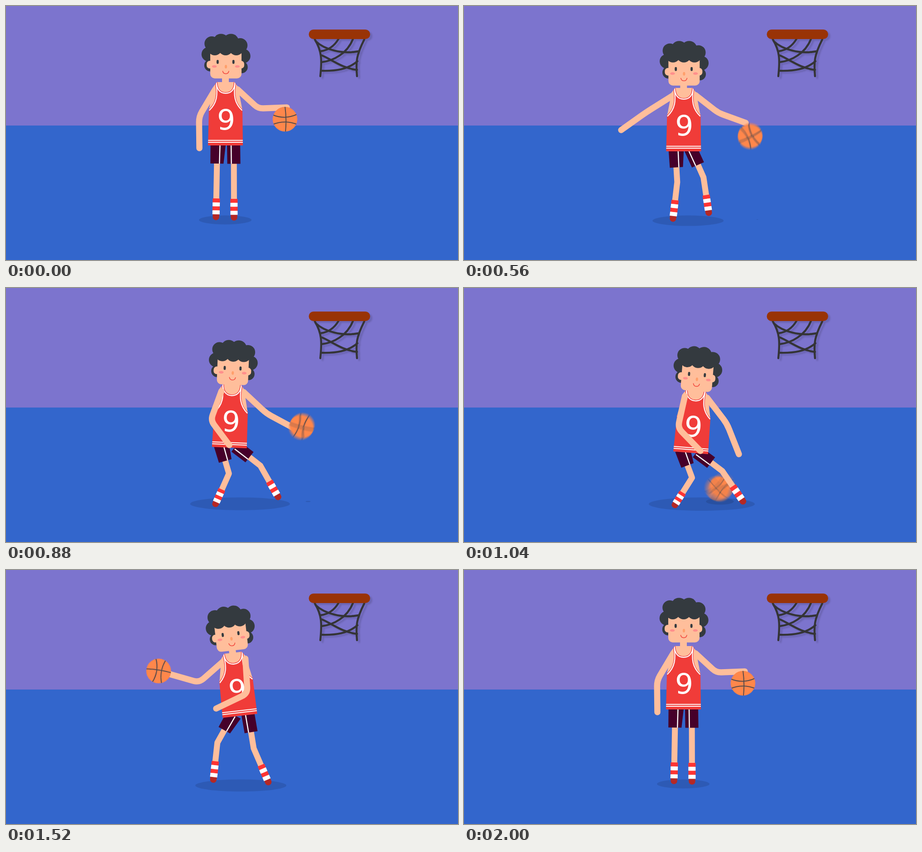
An HTML page with a canvas for the animation above (2080 ms loop, 998x561 px).

```html
<!DOCTYPE html>
<html lang="en">
<head>
<meta charset="utf-8">
<title>Dribble</title>
<style>
  html, body { margin: 0; width: 998px; height: 561px; overflow: hidden; background: #36c; }
  svg, canvas { position: absolute; left: 0; top: 0; display: block; }
  .hoop { filter: blur(.5px) drop-shadow(5px 4px 1.5px rgba(0, 0, 0, .13)); }
  .net { fill: none; stroke: #343436; stroke-width: 4.4; stroke-linecap: round; }
</style>
</head>
<body>
<svg width="998" height="561" viewBox="0 0 998 561">
  <rect width="998" height="264" fill="#7c74ce"/>
  <rect y="264" width="998" height="297" fill="#3366cc"/>
  <g class="hoop">
    <g class="net">
      <path d="M682 74C697 99 698 118 694 155"/>
      <path d="M791 74C774 108 772 122 775 155"/>
      <path d="M684 78C703 96 742 107 779 100"/>
      <path d="M734 73C724 90 710 98 694 100"/>
      <path d="M766 73C754 104 724 121 697 124"/>
      <path d="M697 109C716 116 742 138 775 141"/>
      <path d="M776 122C755 140 728 144 696 143"/>
    </g>
    <rect x="668.5" y="52" width="135.5" height="21" rx="10.5" fill="#993306"/>
  </g>
</svg>
<canvas id="stage" width="998" height="561"></canvas>
<script>
const LOOP = 2080, STEP = 80, SHUTTER = 18, RAD = Math.PI / 180;
const SHIN = 88, FLOOR = 446;
const SKIN = '#ffbe9b', HAIR = '#343a3f', RED = '#f03c39', SOCK = '#ff3434',
      SHOE = '#b42825', SHORTS = '#46002a', SHADE = 'rgba(0,0,0,.11)';
const c = document.getElementById('stage').getContext('2d');

// Torso: x, y of the hem and tilt. Hands and feet: x, y and bend of the joint above.
const stand = {
  torso: [485, 308, 0],
  leftHand: [427, 314, 19], rightHand: [620, 224, 24],
  leftFoot: [463.5, 473, 0], rightFoot: [503.5, 474, 0]
};
const poses = [
  { t: 0, ...stand },
  { t: 320, ...stand, rightHand: [599, 268, -6] },
  { t: 560, leftHand: [347, 274, 2], rightHand: [622, 258, 10] },
  { t: 720, torso: [486, 335, 0], leftHand: [435, 320, 29], rightHand: [650, 253, 23],
    leftFoot: [459, 480, -14], rightFoot: [576, 458, -15] },
  { t: 1040, torso: [501, 364, 4.5], leftHand: [522, 360, 34], rightHand: [607, 367, -10],
    leftFoot: [462, 485, -30], rightFoot: [620, 477, -12] },
  { t: 1200, torso: [495, 350, -1.7], leftHand: [432, 360, 28], rightHand: [543, 355, -17],
    leftFoot: [476, 475, -8], rightFoot: [608, 475, -1] },
  { t: 1520, torso: [517, 322, -6.6], leftHand: [358, 229, -34], rightHand: [464, 306, -43],
    leftFoot: [457, 470, 15], rightFoot: [582, 475, 10] },
  { t: 2000, ...stand }
];

// Pull 1 speeds up towards the point, -1 slows down.
const ballPath = [
  { t: 0, x: 616, y: 250, turn: 0 },
  { t: 370, x: 609, y: FLOOR, turn: 0, pull: 1 },
  { t: 640, x: 634, y: 272, turn: 70, pull: -1 },
  { t: 720, x: 652, y: 274, turn: 95 },
  { t: 800, x: 664, y: 288, turn: 102, pull: 1 },
  { t: 1040, x: 565, y: FLOOR, turn: 135, pull: 1 },
  { t: 1200, x: 420, y: 358, turn: 212 },
  { t: 1400, x: 322, y: 246, turn: 262, pull: -1 },
  { t: 1520, x: 337, y: 223, turn: 280, pull: -1 },
  { t: 1680, x: 364, y: 274, turn: 295, pull: 1 },
  { t: 1840, x: 475, y: FLOOR, turn: 325, pull: 1 },
  { t: 2000, x: 616, y: 250, turn: 360, pull: -1 }
];

function segment(keys, t) {
  let i = 0;
  while (i < keys.length - 2 && t >= keys[i + 1].t) i++;
  const a = keys[i], b = keys[i + 1];
  return { i, a, b, u: Math.max(0, Math.min(1, (t - a.t) / (b.t - a.t))) };
}

// Smooth curve through the poses that never overshoots them.
function track(part, t) {
  const keys = poses.filter(p => p[part]);
  const { i, a, b, u } = segment(keys, t), span = b.t - a.t, v = 1 - u;
  const rate = (k, n) => (keys[k + 1][part][n] - keys[k][part][n]) / (keys[k + 1].t - keys[k].t);
  const slope = (k, n) => {
    if (k < 1 || k > keys.length - 2) return 0;
    const p = rate(k - 1, n), q = rate(k, n);
    return p * q > 0 ? 2 * p * q / (p + q) : 0;
  };
  return a[part].map((from, n) =>
    from * (1 + 2 * u) * v * v + b[part][n] * u * u * (3 - 2 * u)
    + span * (slope(i, n) * u * v * v - slope(i + 1, n) * u * u * v));
}

function ballAt(t) {
  const { a, b, u } = segment(ballPath, t), v = u + (b.pull || 0) * (u * u - u);
  const mix = key => a[key] + (b[key] - a[key]) * v;
  return { x: mix('x'), y: mix('y'), turn: mix('turn') };
}

// Point on the way from a to b, pushed sideways by bend.
function joint([ax, ay], [bx, by], share, bend) {
  const dx = bx - ax, dy = by - ay, d = Math.hypot(dx, dy);
  return [ax + dx * share - dy / d * bend, ay + dy * share + dx / d * bend];
}
function onTorso([x, y, tilt], dx, dy) {
  const cos = Math.cos(tilt * RAD), sin = Math.sin(tilt * RAD);
  return [x + dx * cos - dy * sin, y + dx * sin + dy * cos];
}
const between = (a, b, k) => a.map((v, i) => v + (b[i] - v) * k);
const angle = (a, b) => Math.atan2(b[1] - a[1], b[0] - a[0]) / RAD - 90;
const gap = (a, b) => Math.hypot(b[0] - a[0], b[1] - a[1]);

function ellipse(x, y, rx, ry, fill) {
  c.beginPath();
  c.ellipse(x, y, rx, ry, 0, 0, 7);
  c.fillStyle = fill;
  c.fill();
}
function box(x, y, w, h, r, fill) {
  c.beginPath();
  c.roundRect(x, y, w, h, r);
  c.fillStyle = fill;
  c.fill();
}
function shape(d, fill) {
  c.fillStyle = fill;
  c.fill(new Path2D(d));
}
function line(d, color, width, g = c) {
  g.strokeStyle = color;
  g.lineWidth = width;
  g.stroke(new Path2D(d));
}
// Draws in resting coordinates, moved so that the pivot lands on x, y.
function placed([x, y], deg, px, py, draw) {
  c.save();
  c.translate(x, y);
  c.rotate(deg * RAD);
  c.translate(-px, -py);
  draw();
  c.restore();
}

function arm(shoulder, [hx, hy, bend]) {
  const hand = [hx, hy], elbow = joint(shoulder, hand, .5, bend);
  c.lineCap = c.lineJoin = 'round';
  line(`M${shoulder}L${between(elbow, shoulder, .18)}Q${elbow} ${between(elbow, hand, .18)}L${hand}`, SKIN, 13.5);
}

// The thigh looks shorter as the body sinks; shorts and socks shrink with their bones.
function leg(hip, [fx, fy, bend], side) {
  const toe = [fx, fy], reach = gap(hip, toe), shin = Math.min(SHIN, reach * .58);
  const knee = joint(hip, toe, 1 - shin / reach, bend);
  const hem = gap(hip, knee) * .52;
  c.lineCap = 'butt';
  c.lineJoin = 'round';
  line(`M${hip}L${knee}L${between(knee, toe, .8)}`, SKIN, 13);
  placed(toe, angle(knee, toe), 0, 0, () => {
    c.scale(1, shin / SHIN);
    box(-7.2, -16, 14.4, 16, [0, 0, 7.2, 7.2], SHOE);
    for (let i = 0; i < 4; i++) box(-8, -48 + i * 8.8, 16, 8.8, 0, i % 2 ? '#fff' : SOCK);
  });
  placed(hip, angle(hip, knee), 0, 0, () => {
    shape(`M-15-6H${side < 0 ? 19 : 14}L14.5 ${hem}H-14Z`.replace('H-14Z', `L-14.5 ${hem}Z`), SHORTS);
    c.lineCap = 'butt';
    line(`M${-side * 6}-4L${-side * 5.5} ${hem}`, '#fff', 2.4);
  });
}

const NECKLINE = 'M467 167C467 183 474 190.5 485 190.5S503 183 503 167';
const HOLES = 'M462 172C465 196 464 213 447 229M508 172C505 196 506 213 523 229';
const JERSEY = 'M462 172L467 167C467 183 474 190.5 485 190.5S503 183 503 167L508 172' +
  'C505 196 506 213 522 228L523 308H446L448 228C464 213 465 196 462 172Z';

function skinTorso() {
  box(477, 152, 15, 24, 0, SKIN);
  shape('M466 168L458 178L448 230H522L512 178L504 168Z', SKIN);
}
function jersey() {
  shape(JERSEY, RED);
  c.save();
  c.clip(new Path2D(JERSEY));
  c.lineCap = 'butt';
  line(NECKLINE + HOLES, '#fff', 7);
  line(NECKLINE + HOLES, RED, 2.6);
  line('M440 296.8H530M440 301H530', '#fff', 2);
  c.restore();
  c.fillStyle = '#fff';
  c.font = '63px "DejaVu Sans", sans-serif';
  c.textAlign = 'center';
  c.fillText('9', 486, 272.5);
}

function head() {
  for (const side of [-1, 1])
    for (const [dx, y, r] of [[11, 79, 17.5], [31.5, 85, 16], [38, 108.5, 16], [34.5, 133, 13.5]])
      ellipse(485.7 + side * dx, y + side * 2 * (dx > 30), r, r, HAIR);
  box(443, 121, 14, 17, 7, SKIN);
  box(512, 121, 14, 17, 7, SKIN);
  box(451, 92, 69, 68, 10, SKIN);
  for (const x of [461, 485, 508.5]) ellipse(x, 93, 16, 16, HAIR);
  box(452, 76, 66, 26, 6, HAIR);
  for (const x of [467.3, 502.2]) box(x - 2.4, 119, 4.8, 9, 2.4, HAIR);
  for (const x of [460, 510.8]) ellipse(x, 133.5, 5.3, 2.8, '#ff8f8c');
  ellipse(485.5, 134, 2.6, 4, '#ff9f6b');
  c.lineCap = 'round';
  line('M478.5 144C480 151.5 490.5 151.5 492 144', '#f2493f', 1.6);
}

function surface(size) {
  const el = document.createElement('canvas');
  el.width = el.height = size;
  const g = el.getContext('2d');
  g.translate(size / 2, size / 2);
  return g;
}
const sprite = surface(64), layer = surface(128);
sprite.arc(0, 0, 27.2, 0, 7);
sprite.fillStyle = '#ff7c3e';
sprite.fill();
sprite.clip();
line('M0-28Q4 0 1 28M-27-9.5Q0 1.5 27-11M-27 11.5Q0 1 27 11.5', '#4a4644', 2, sprite);
layer.globalCompositeOperation = 'lighter';

// Motion blur: the mean of copies along the path while the shutter is open.
function ball(t) {
  const mid = ballAt(t), n = 15;
  layer.clearRect(-64, -64, 128, 128);
  layer.globalAlpha = 1 / n;
  for (let i = 0; i < n; i++) {
    const b = ballAt(t + (i / (n - 1) - .5) * SHUTTER);
    layer.save();
    layer.translate(b.x - mid.x, b.y - mid.y);
    layer.rotate(b.turn * RAD);
    layer.drawImage(sprite.canvas, -32, -32);
    layer.restore();
  }
  c.drawImage(layer.canvas, mid.x - 64, mid.y - 64);
}

function shadows(torso, left, right, b) {
  const half = (right[0] - left[0]) / 2, middle = (left[0] + right[0]) / 2;
  const spread = (half - 20) * .08;
  ellipse(middle + (torso[0] - middle) * .4, 472.5 + spread, half + 38, 10 + spread, SHADE);
  const size = (b.y - 275) * .18;
  if (size > 0) ellipse(b.x + (FLOOR - b.y) * .1, 471.5, size, size * .23, SHADE);
}

function draw(t) {
  const torso = track('torso', t), tilt = torso[2];
  const leftFoot = track('leftFoot', t), rightFoot = track('rightFoot', t);
  const leftArm = () => arm(onTorso(torso, -23, -124), track('leftHand', t));
  const rightArm = () => arm(onTorso(torso, 26, -124), track('rightHand', t));
  const leftFront = t >= 880 && t < 1200, rightFront = t >= 1280 && t < 1760;
  const ballBehind = t >= 960 && t < 1200;
  const sink = (torso[1] - stand.torso[1]) * .2;

  c.clearRect(0, 0, 998, 561);
  shadows(torso, leftFoot, rightFoot, ballAt(t));
  if (ballBehind) ball(t);
  leg(onTorso(torso, -18.5, 0), leftFoot, -1);
  leg(onTorso(torso, 18, 0), rightFoot, 1);
  placed(torso, tilt, 485, 308, skinTorso);
  if (!leftFront) leftArm();
  if (!rightFront) rightArm();
  placed(torso, tilt, 485, 308, jersey);
  if (leftFront) leftArm();
  if (rightFront) rightArm();
  placed(onTorso(torso, 0, sink - 148), tilt, 485, 160, head);
  if (!ballBehind) ball(t);
}

const start = performance.now();
function frame() {
  const t = (performance.now() - start) % LOOP;
  draw(Math.floor(t / STEP) * STEP);
  requestAnimationFrame(frame);
}
frame();
</script>
</body>
</html>
```
